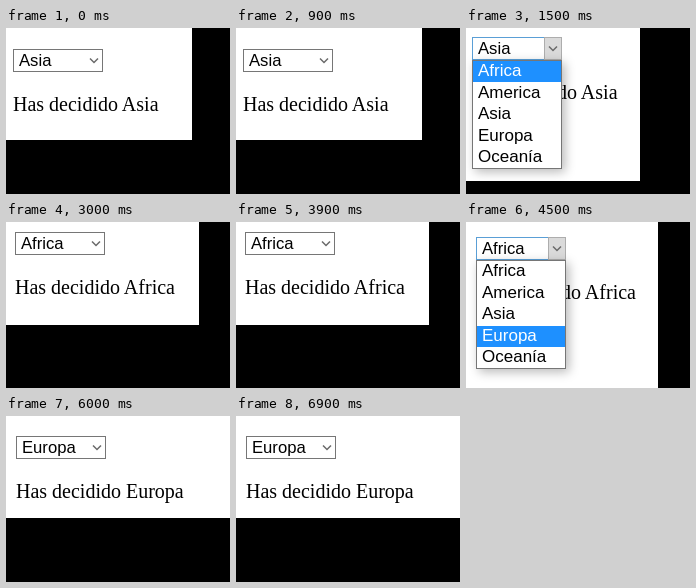
An HTML page with a canvas that plays this animation: 224 px wide and 166 px high, repeating every 7500 ms.

```html
<!DOCTYPE html>
<html lang="es">
<head>
<meta charset="utf-8">
<title>Selector de continente</title>
<style>
  html, body { margin: 0; width: 100%; height: 100%; overflow: hidden; background: #000; }
  canvas { display: block; width: 224px; height: 166px; }
</style>
</head>
<body>
<canvas id="stage" width="224" height="166"></canvas>
<script>
const ctx = document.getElementById('stage').getContext('2d');
const STEP = 1500;
const ROW = 21.4;
const BOX_W = 90, BOX_H = 23, LIST_H = 109;
const OPTIONS = ['Africa', 'America', 'Asia', 'Europa', 'Oceanía'];
const SANS = '16.67px "Liberation Sans", Arial, sans-serif';
const LIST_SANS = '17px "Liberation Sans", Arial, sans-serif';
const SERIF = '20px "Liberation Serif", "Times New Roman", serif';

// kerns across spaces as well
ctx.textRendering = 'optimizeLegibility';

// w, h: white page area; x, y: corner of the select box; hover: highlighted option
const scenes = [
  { w: 186, h: 112, x: 7, y: 21, value: 'Asia' },
  { w: 174, h: 153, x: 6, y: 9, value: 'Asia', hover: 'Africa' },
  { w: 193, h: 103, x: 9, y: 10, value: 'Africa' },
  { w: 192, h: 166, x: 10, y: 15, value: 'Africa', hover: 'Europa' },
  { w: 224, h: 102, x: 10, y: 20, value: 'Europa' }
];

function rect(color, x, y, w, h) {
  ctx.fillStyle = color;
  ctx.fillRect(x, y, w, h);
}

function frame(color, x, y, w, h) {
  ctx.strokeStyle = color;
  ctx.lineWidth = 1;
  ctx.strokeRect(x + 0.5, y + 0.5, w - 1, h - 1);
}

function text(str, x, y, font, color = '#000') {
  ctx.font = font;
  ctx.fillStyle = color;
  ctx.fillText(str, x, y);
}

function drawSelect({ x, y, value, hover }) {
  rect('#fff', x, y, BOX_W, BOX_H);
  frame(hover ? '#5a9fd6' : '#767676', x, y, BOX_W, BOX_H);
  if (hover) {
    rect('#dadada', x + 72, y, 18, BOX_H);
    frame('#adadad', x + 72, y, 18, BOX_H);
  }
  text(value, x + 6, y + 17, SANS);

  const cy = y + 9.5;
  ctx.strokeStyle = '#6a6a6a';
  ctx.lineWidth = 1.5;
  ctx.beginPath();
  ctx.moveTo(x + 77, cy);
  ctx.lineTo(x + 81, cy + 4);
  ctx.lineTo(x + 85, cy);
  ctx.stroke();
}

function drawList({ x, y, hover }) {
  const top = y + BOX_H;
  ctx.save();
  ctx.shadowColor = 'rgba(0,0,0,.28)';
  ctx.shadowBlur = 10;
  ctx.shadowOffsetX = 3;
  ctx.shadowOffsetY = 3;
  rect('#fff', x, top, BOX_W, LIST_H);
  ctx.restore();
  OPTIONS.forEach((name, i) => {
    const rowY = Math.round(top + 1.35 + i * ROW);
    const on = name === hover;
    if (on) rect('#1e90ff', x + 1, rowY, BOX_W - 2, 21);
    text(name, x + 6, rowY + 15, LIST_SANS, on ? '#fff' : '#000');
  });
  frame('#767676', x, top, BOX_W, LIST_H);
}

function draw(now) {
  const s = scenes[Math.floor(now / STEP) % scenes.length];
  rect('#000', 0, 0, 224, 166);
  ctx.save();
  ctx.beginPath();
  ctx.rect(0, 0, s.w, s.h);
  ctx.clip();
  rect('#fff', 0, 0, s.w, s.h);
  text('Has decidido ' + s.value, s.x, s.y + 62, SERIF);
  drawSelect(s);
  if (s.hover) drawList(s);
  ctx.restore();
}

const start = performance.now();
function tick() {
  draw(performance.now() - start);
  requestAnimationFrame(tick);
}
tick();
</script>
</body>
</html>
```
